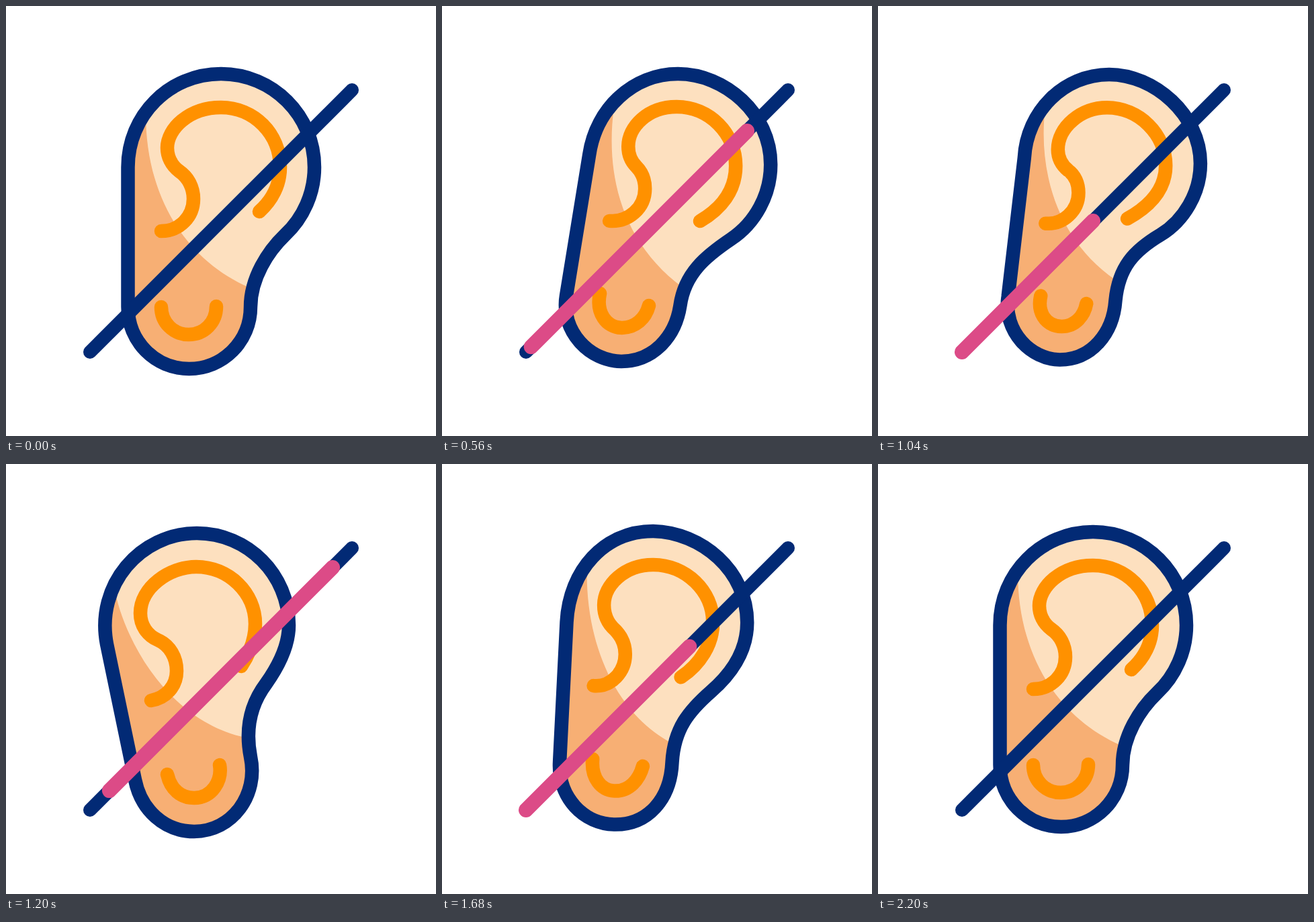
Animation, 640 px wide and 640 px high, one loop 2440 ms. Source, as an HTML page without scripts:

```html
<!DOCTYPE html>
<html lang="en">
<head>
<meta charset="utf-8">
<title>Ear with strike-through</title>
<style>
html, body { margin: 0; width: 100%; height: 100%; overflow: hidden; background: #fff; }

/* frame counter, 40 ms per tick */
@property --u { syntax: "<number>"; inherits: true; initial-value: 0; }
@keyframes tick { to { --u: 61; } }

svg {
  display: block; width: 100%; height: 100%;
  fill: none; stroke-width: 20.5; stroke-linecap: round; stroke-linejoin: round;
  animation: tick 2.44s steps(61) infinite;
}

/* default easing: six-step ease-in for the first lean */
.ear, .shade, .curl, .lobe {
  animation: ear 2.44s infinite;
  animation-timing-function: linear(0 0% 16.67%, .038 16.67% 33.33%, .145 33.33% 50%,
    .308 50% 66.67%, .514 66.67% 83.33%, .749 83.33% 100%);
}
.shade { animation-name: shade; fill: #f7af74; }
.curl { animation-name: curl; }
.lobe { animation-name: lobe; }
.curl, .lobe { stroke: #ff9100; }
.skin { fill: #fde0bf; }
.rim, .bar { stroke: #022a75; }
.bar { stroke-width: 20; }

/* pink dash: head leads, tail follows 8 ticks later */
.dash {
  --n: calc(var(--u) - var(--p));
  --a: clamp(0, (var(--n) - 5) / 12, 1);
  --b: clamp(0, (var(--n) - 13) / 12, 1);
  --head: calc(var(--a) * var(--a) * (3 - 2 * var(--a)));
  --tail: calc(var(--b) * var(--b) * (3 - 2 * var(--b)));
  stroke: #dc4b87; stroke-width: 22;
  stroke-dasharray: calc((var(--head) - var(--tail)) * 551.5px) 900px;
  stroke-dashoffset: calc(var(--tail) * -551.5px);
  opacity: clamp(0, min(var(--n) - 5, 25 - var(--n)), 1);
}

@keyframes ear {
  0%, 13.11%, 90.16%, 100% { d: path("M181.5,448L181.5,240C181.5,163 243,101 320,101C397,101 459,163 459,240C459,278 443,315 415,341C390,365 364,405 364,448C364,499 323,540 272.5,540C222,540 181.5,499 181.5,448Z"); }
  22.95% { d: path("M185,431L219,221C229,153 284,101 351,101C421,101 489,160 489,236C489,281 466,323 430,347C393,372 361,398 354.5,446C347,495 312,529 267,529C220,529 176,484 185,431Z"); animation-timing-function: cubic-bezier(.333, .48, .667, 1); }
  34.42% { d: path("M195,402L272,193C292,139 338,101 392,101C452,101 527,160 527,230C527,284 495,333 448,351C392,372 361,388 345,440C329,484 302,510 263,510C222,510 174,460 195,402Z"); animation-timing-function: cubic-bezier(.333, 0, .667, .654); }
  49.18% { d: path("M192,470L150,268C133,180 200,103 284,103C360,103 421,165 421,240C421,273 404,303 387,327C366,355 355,390 364,436C376,492 337,547 280,547C236,547 201,515 192,470Z"); animation-timing-function: steps(3); }
  54.09% { d: path("M191,484L126,283C101,188 172,103 262,103C342,103 400,166 400,242C400,271 386,297 375,322C359,352 353,389 368,435C385,494 344,549 283,549C239,549 206,526 191,484Z"); animation-timing-function: steps(5); }
  62.29% { d: path("M164,444L174,237C178,159 230,100 304,100C376,102 444,160 444,237C444,280 418,316 390,340C360,366 338,395 335,444C333,500 297,537 249,537C201,537 161,497 164,444Z"); animation-timing-function: steps(9); }
  77.04% { d: path("M189,442L200,233C204,157 256,100 327,100C398,101 467,157 467,235C467,281 440,314 413,337C377,369 355,392 352,443C349,499 317,536 270,536C223,536 186,494 189,442Z"); animation-timing-function: steps(8); }
}
@keyframes shade {
  0%, 13.11%, 90.16%, 100% { d: path("M208,160C208,285 268,378 362,419L450,600L50,600L50,160Z"); }
  22.95% { d: path("M256,148C241,256 271,354 357,418L450,600L50,600L50,148Z"); animation-timing-function: cubic-bezier(.333, .48, .667, 1); }
  34.42% { d: path("M320,130C286,215 276,315 351,408L450,600L50,600L50,130Z"); animation-timing-function: cubic-bezier(.333, 0, .667, .654); }
  49.18% { d: path("M160,180C178,275 250,385 356,407L450,600L50,600L50,180Z"); animation-timing-function: steps(3); }
  54.09% { d: path("M128,190C156,287 244,399 356,406L450,600L50,600L50,190Z"); animation-timing-function: steps(5); }
  62.29% { d: path("M203,150C200,270 250,372 334,416L450,600L50,600L50,150Z"); animation-timing-function: steps(9); }
  77.04% { d: path("M232,148C226,270 276,375 350,413L450,600L50,600L50,148Z"); animation-timing-function: steps(8); }
}
@keyframes curl {
  0%, 13.11%, 90.16%, 100% { d: path("M231,335C258,335 279,314 279,287C279,270 271,255 258,246C246,237 240,224 240,211C240,183 272,151 320,151C369,151 408,190 408,240C408,266 396,289 377,306"); }
  22.95% { d: path("M249,320C277,322 302,301 302,272C302,259 298,248 289,239C281,231 277,220 277,209C277,180 306,150 349,150C398,150 437,190 437,238C437,275 415,302 384,320"); animation-timing-function: cubic-bezier(.333, .48, .667, 1); }
  34.42% { d: path("M276,301C305,308 334,284 334,254C334,245 332,237 329,231C324,222 322,215 322,207C322,177 350,150 387,150C434,150 474,190 474,237C474,283 437,311 388,329"); animation-timing-function: cubic-bezier(.333, 0, .667, .654); }
  49.18% { d: path("M216,352C238,348 254,331 254,308C254,288 244,270 226,262C210,255 200,240 200,222C200,184 243,153 283,153C332,153 371,192 371,238C371,262 362,283 350,301"); animation-timing-function: steps(3); }
  54.09% { d: path("M204,362C225,356 238,340 238,319C238,297 226,277 205,268C187,262 176,245 176,225C176,185 222,154 262,154C312,154 350,192 350,238C350,258 347,277 342,295"); animation-timing-function: steps(5); }
  62.29% { d: path("M215,331C242,333 263,310 263,284C263,270 257,257 247,247C236,238 230,224 230,210C230,180 262,150 305,150C352,150 393,189 393,236C393,268 377,298 349,316"); animation-timing-function: steps(9); }
  77.04% { d: path("M239,329C265,331 285,308 285,282C285,268 280,256 270,246C260,236 255,224 255,210C255,180 284,150 326,150C375,150 416,188 416,236C416,268 393,299 364,319"); animation-timing-function: steps(8); }
}
@keyframes lobe {
  0%, 13.11%, 90.16%, 100% { d: path("M231,448C231,471 249,489 272,489C295,489 313,471 313,447"); }
  22.95% { d: path("M235,428C229,456 244,479 268,479C288,479 303,465 308,446"); animation-timing-function: cubic-bezier(.333, .48, .667, 1); }
  34.42% { d: path("M244,407C231,430 237,459 268,461C284,461 295,452 304,439"); animation-timing-function: cubic-bezier(.333, 0, .667, .654); }
  49.18% { d: path("M240,462C245,484 260,497 280,497C307,497 322,471 318,448"); animation-timing-function: steps(3); }
  54.09% { d: path("M239,473C248,495 265,504 282,504C312,504 327,475 321,450"); animation-timing-function: steps(5); }
  62.29% { d: path("M214,440C212,467 226,487 249,487C270,487 285,470 290,449"); animation-timing-function: steps(9); }
  77.04% { d: path("M237,438C234,466 249,486 270,486C290,486 304,470 310,451"); animation-timing-function: steps(8); }
}
</style>
</head>
<body>
<svg viewBox="0 0 640 640">
  <clipPath id="inside"><path class="ear"/></clipPath>
  <path class="ear skin"/>
  <g clip-path="url(#inside)"><path class="shade"/></g>
  <path class="curl"/>
  <path class="lobe"/>
  <path class="ear rim"/>
  <path class="bar" d="M125,515L515,125"/>
  <path class="dash" style="--p:0" d="M125,515L515,125"/>
  <path class="dash" style="--p:15" d="M125,515L515,125"/>
  <path class="dash" style="--p:30" d="M125,515L515,125"/>
</svg>
</body>
</html>
```
